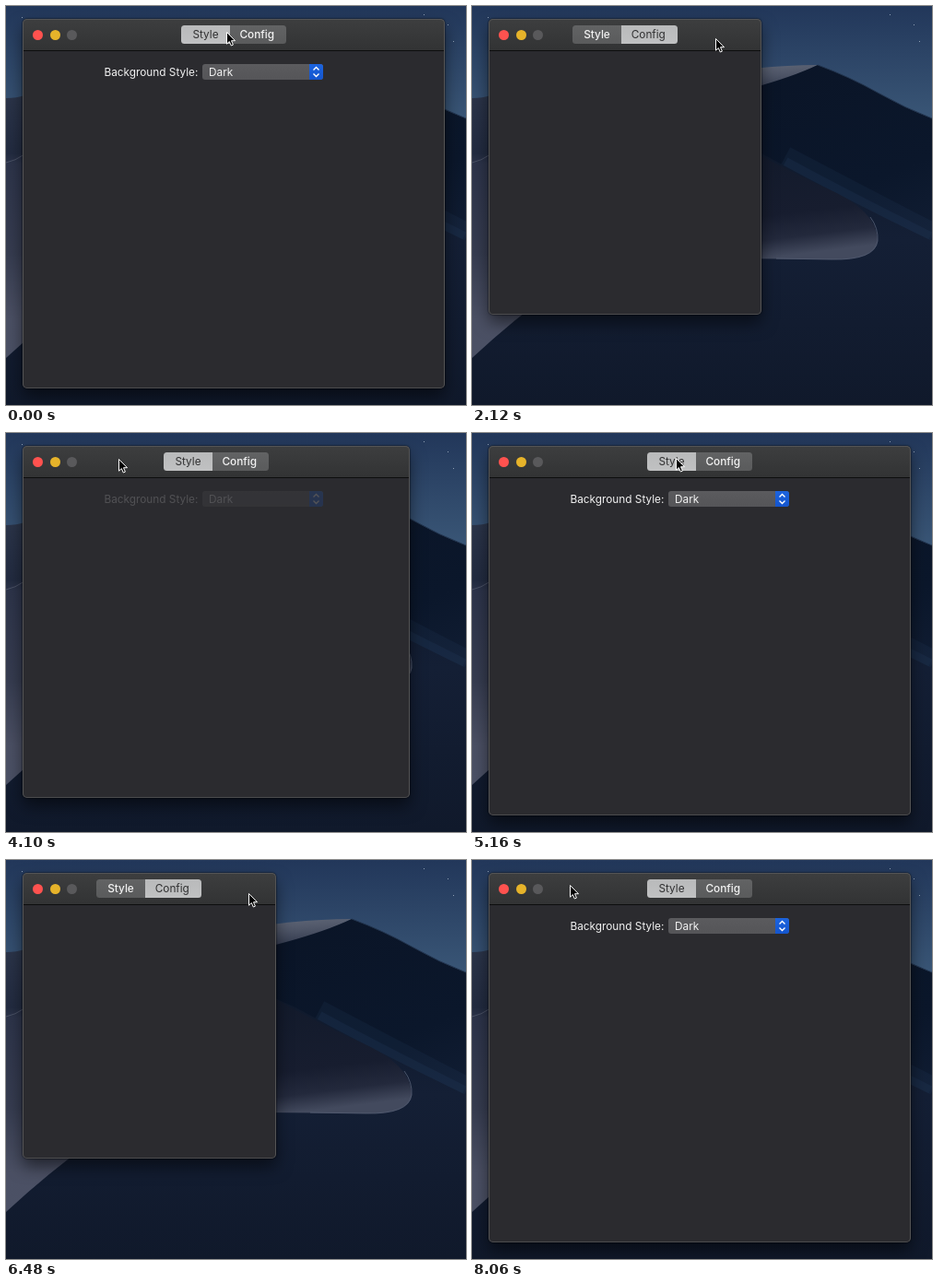
An HTML page that plays this animation: 499 by 433 pixels, repeating every 8260 ms.

```html
<!DOCTYPE html>
<html>
<head>
<meta charset="utf-8">
<style>
html, body { margin: 0; width: 100%; height: 100%; overflow: hidden; background: #131d31; }
body { position: relative; font: 11.8px/20px Inter, "Open Sans", sans-serif; color: #f2f2f2; }
svg { position: absolute; left: 0; top: 0; }
div { position: absolute; box-sizing: border-box; }
#win { left: 18px; top: 14px; border-radius: 5px; background: #2b2b2f; overflow: hidden; }
#shade, #rim { left: 18px; top: 14px; border-radius: 5px; }
#shade { box-shadow: 0 9px 17px rgba(0,0,0,.5), 0 0 2px #000; }
#rim { border: 1px solid #545455; border-bottom-color: #4c4c4e; }
#bar { left: 0; top: 0; width: 100%; height: 35px; background: linear-gradient(#3d3e3f, #323334); border-bottom: 1px solid #0d0d0e; }
.light { top: 11.5px; width: 11px; height: 11px; border-radius: 50%; }
#tabs { top: 7px; width: 113.5px; height: 20px; border-radius: 3.5px; overflow: hidden; text-align: center; }
#tabs div { top: 0; height: 20px; line-height: 21px; font-weight: 500; background: linear-gradient(#626364, #5a5b5c); }
#tabs .on { background: linear-gradient(#b9babb, #c0c1c2); color: #303031; font-weight: 400; }
#tabs .down { background: linear-gradient(#858586, #7b7b7c); color: #fff; }
#form { left: 0; top: 0; width: 458px; height: 80px; white-space: nowrap; }
#label { left: 88.5px; top: 48px; }
#popup { left: 195px; top: 49px; width: 131px; height: 17px; border-radius: 3px; overflow: hidden;
  background: linear-gradient(#5b5b5e, #555558); padding-left: 7px; line-height: 18px; }
#step { right: 0; top: 0; width: 15px; height: 17px; background: linear-gradient(#1c64de, #1455ce); }
</style>
</head>
<body>
<svg width="499" height="433">
  <defs>
    <linearGradient id="sky" x2="0" y2="1"><stop stop-color="#22375a"/><stop offset="1" stop-color="#3b5878"/></linearGradient>
    <linearGradient id="far" x2=".35" y2="1"><stop stop-color="#0a1426"/><stop offset=".55" stop-color="#0b172b"/><stop offset="1" stop-color="#17243c"/></linearGradient>
    <linearGradient id="bowl" x2=".15" y2="1"><stop stop-color="#121a2b"/><stop offset=".65" stop-color="#171d2f"/><stop offset=".85" stop-color="#23293c"/><stop offset="1" stop-color="#434a5e"/></linearGradient>
    <linearGradient id="floor" x2="0" y2="1"><stop stop-color="#0e1829"/><stop offset=".45" stop-color="#141f35"/><stop offset="1" stop-color="#10192b"/></linearGradient>
    <linearGradient id="ridge" x2=".2" y2="1"><stop stop-color="#626979"/><stop offset=".4" stop-color="#4f5668"/><stop offset="1" stop-color="#2a3246"/></linearGradient>
    <linearGradient id="west" x2="0" y2="1"><stop stop-color="#2b3449"/><stop offset=".22" stop-color="#222b40"/><stop offset=".26" stop-color="#2d344a"/><stop offset=".6" stop-color="#363c50"/><stop offset=".85" stop-color="#4b5064"/><stop offset="1" stop-color="#4b5165"/></linearGradient>
  </defs>
  <path fill="url(#sky)" d="M0 0H499V130H0z"/>
  <path fill="#8fa0b4" d="M479 20h1v1h-1zM485 38h1v1h-1zM453 9h1v1h-1zM17 12h1v1h-1z"/>
  <path fill="url(#ridge)" d="M240 78Q310 64 375 64Q340 82 270 100z"/>
  <path fill="url(#far)" d="M375 64Q410 77 440 94T499 122V433H200V112Q320 90 375 64z"/>
  <path fill="none" stroke="#22344e" d="M375 64Q410 77 440 94T499 122"/>
  <g fill="none" stroke="#2a4266">
    <path stroke-width="22" opacity=".15" d="M340 163Q410 200 499 246"/>
    <path stroke-width="10" opacity=".2" d="M340 169Q410 207 499 251"/>
  </g>
  <path fill="url(#floor)" d="M200 110L314 160Q400 207 499 255V433H0V300z"/>
  <path fill="url(#bowl)" d="M285 147Q335 175 385 198Q440 222 440 255Q437 276 390 275L285 274z"/>
  <path fill="none" stroke="#586176" stroke-width=".8" d="M432 229Q441 241 440 255Q437 276 390 275L330 274"/>
  <path fill="url(#west)" d="M0 100Q12 100 20 97L100 300Q45 340 0 382z"/>
  <path fill="none" stroke="#4a5165" d="M0 170Q10 168 20 161"/>
</svg>
<div id="shade"></div>
<div id="win">
  <div id="form">
    <div id="label">Background Style:</div>
    <div id="popup">Dark<div id="step">
      <svg width="15" height="17" fill="none" stroke="#fff" stroke-width="1.4"><path d="M4.5 6.5l3-3 3 3M4.5 10.5l3 3 3-3"/></svg>
    </div></div>
  </div>
  <div id="bar">
    <div class="light" style="left:11px;background:#ff524f"></div>
    <div class="light" style="left:29.5px;background:#e6b32a"></div>
    <div class="light" style="left:48px;background:#59595b"></div>
    <div id="tabs">
      <div style="left:0;width:53px">Style</div>
      <div style="left:53px;width:60.5px;padding-right:2px">Config</div>
    </div>
  </div>
</div>
<div id="rim"></div>
<svg width="499" height="433">
  <path id="arrow" d="M.5.5V13.2L3.3 10.5 5.3 15 7.4 14.1 5.5 9.7H9.5z" fill="#000" stroke="#fff"/>
</svg>
<script>
const LOOP = 8260, RESIZE = 420;
const BIG = [458, 401], SMALL = [275, 310];
const $ = id => document.getElementById(id);
const tabs = [...$('tabs').children];

// Each click: press time, release time, resize start, tab index.
const clicks = [
  [1620, 1760, 1790, 1],
  [3680, 3780, 3805, 0],
  [5390, 5480, 5505, 1],
  [7030, 7125, 7152, 0]
];

// Pointer tip: time, x, y.
const path = [
  [0, 239, 28], [120, 248, 30], [360, 264, 35],
  [2660, 264, 35], [2800, 232, 34], [3060, 140, 30], [3260, 122, 28],
  [4940, 122, 28], [5020, 146, 27], [5160, 221, 27], [5240, 254, 32], [5320, 263, 36],
  [6480, 263, 36], [6600, 232, 34], [6800, 130, 29], [6940, 106, 27],
  [LOOP, 106, 27]
];

const clamp = v => Math.max(0, Math.min(1, v));
const ease = v => (v = clamp(v), v * v * (3 - 2 * v));

function pointer(t) {
  const i = path.findIndex(p => p[0] > t);
  const [t0, x0, y0] = path[i - 1], [t1, x1, y1] = path[i];
  const k = (t - t0) / (t1 - t0);
  return [x0 + (x1 - x0) * k, y0 + (y1 - y0) * k];
}

function draw(t) {
  let open = 1, shown = 1, active = 0, pressed = -1;
  for (const [down, up, start, tab] of clicks) {
    if (t >= down && t < up) pressed = tab;
    if (t >= up) active = tab;
    if (t >= start) {
      const k = ease((t - start) / RESIZE);
      open = tab ? 1 - k : k;
      shown = tab ? 1 - clamp((t - start) / 160) : clamp((t - start - 240) / 300);
    }
  }
  const [w, h] = BIG.map((b, i) => Math.round(SMALL[i] + (b - SMALL[i]) * open));
  for (const id of ['win', 'shade', 'rim']) {
    $(id).style.width = w + 'px';
    $(id).style.height = h + 'px';
  }
  $('tabs').style.left = Math.floor(w / 2 - 57) + 'px';
  $('form').style.opacity = shown;
  tabs.forEach((tab, i) => tab.className = i === pressed ? 'down' : i === active ? 'on' : '');
  const [x, y] = pointer(t).map(Math.round);
  $('arrow').setAttribute('transform', `translate(${x} ${y})`);
}

const begin = performance.now();
function frame() {
  draw((performance.now() - begin) % LOOP);
  requestAnimationFrame(frame);
}
frame();
</script>
</body>
</html>
```
